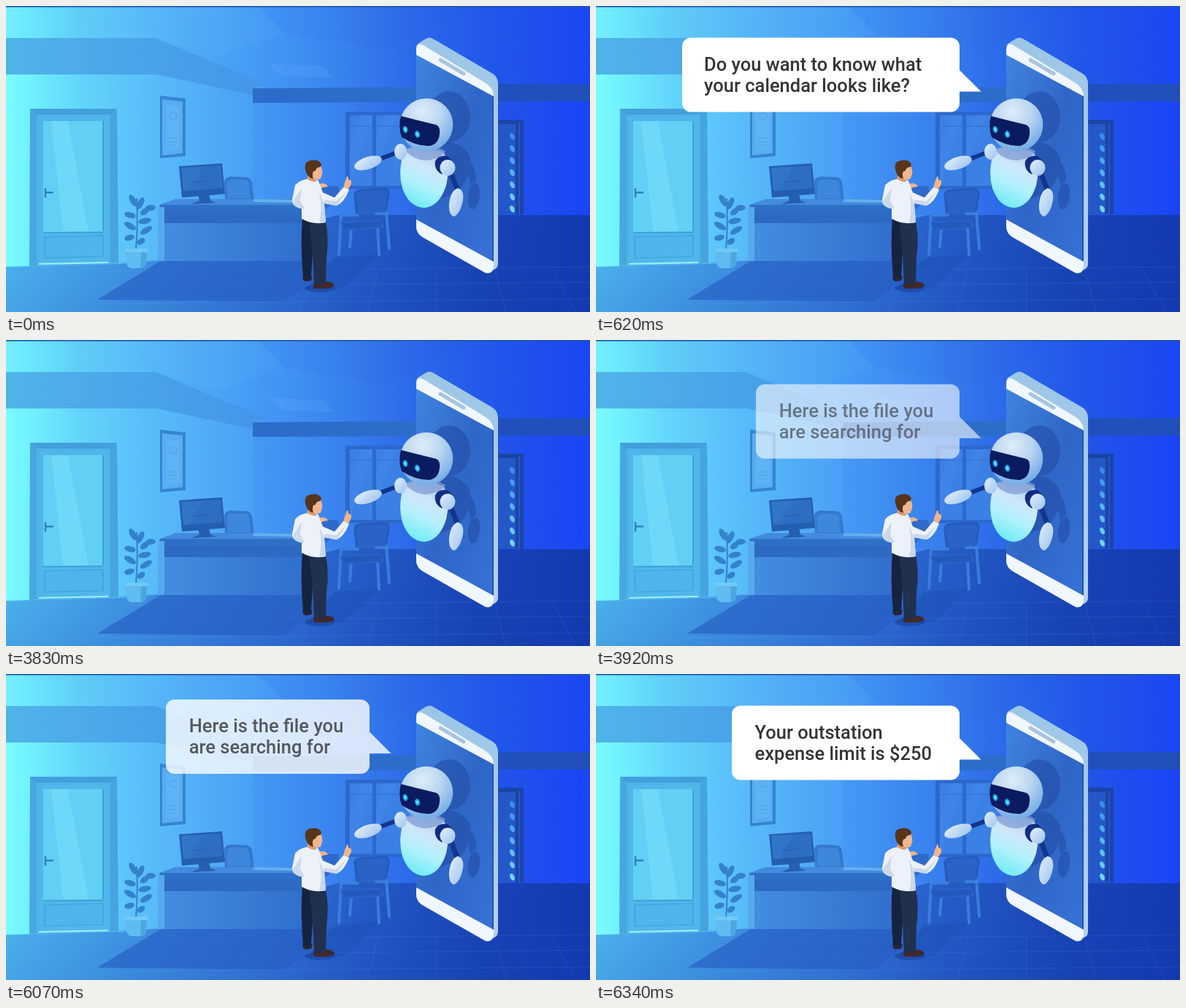
Animation, 800 px wide and 420 px high, one loop 8 s. Source, as an HTML page:

```html
<!DOCTYPE html>
<html lang="en">
<head>
<meta charset="utf-8">
<title>Office assistant</title>
<style>
  html, body { margin: 0; width: 100%; height: 100%; overflow: hidden; background: #2f7ae5; }
  svg { display: block; width: 100vw; height: 100vh; }
  text { font: 500 25.5px Roboto, Arial, sans-serif; fill: #333438; }
</style>
</head>
<body>
<svg id="stage" viewBox="0 0 800 420">
  <defs>
    <linearGradient id="wall" gradientUnits="userSpaceOnUse" x1="0" x2="800" y1="0" y2="0">
      <stop offset="0" stop-color="#7afcff"/><stop offset=".045" stop-color="#70f0fe"/>
      <stop offset=".12" stop-color="#64d6fb"/><stop offset=".25" stop-color="#58bcf9"/>
      <stop offset=".42" stop-color="#4aa0f6"/><stop offset=".56" stop-color="#3d87f0"/>
      <stop offset=".7" stop-color="#2d69e9"/><stop offset=".85" stop-color="#2153ea"/>
      <stop offset="1" stop-color="#1a44f6"/>
    </linearGradient>
    <linearGradient id="floor" gradientUnits="userSpaceOnUse" x1="0" x2="800" y1="0" y2="0">
      <stop offset="0" stop-color="#50bcf2"/><stop offset=".2" stop-color="#439be8"/>
      <stop offset=".42" stop-color="#367bdb"/><stop offset=".6" stop-color="#255dc8"/>
      <stop offset=".8" stop-color="#1945b6"/><stop offset="1" stop-color="#1439b0"/>
    </linearGradient>
    <linearGradient id="shade" x1="0" x2="0" y1="0" y2="1">
      <stop offset="0" stop-color="#1238a8" stop-opacity="0"/><stop offset="1" stop-color="#1238a8" stop-opacity=".18"/>
    </linearGradient>
    <linearGradient id="glass" x1="0" x2="1" y1="0" y2="1">
      <stop offset="0" stop-color="#3f84e0"/><stop offset=".5" stop-color="#2f66c8"/><stop offset="1" stop-color="#3672d4"/>
    </linearGradient>
    <linearGradient id="edge" x1="0" x2="0" y1="0" y2="1">
      <stop offset="0" stop-color="#9cc6e6"/><stop offset="1" stop-color="#b5d2ef"/>
    </linearGradient>
    <linearGradient id="band" x1="0" x2="1" y1="0" y2="0">
      <stop offset="0" stop-color="#50b4e8"/><stop offset="1" stop-color="#4494ea"/>
    </linearGradient>
    <linearGradient id="desk" x1="0" x2="1" y1="0" y2="0">
      <stop offset="0" stop-color="#438ee0"/><stop offset="1" stop-color="#306ece"/>
    </linearGradient>
    <radialGradient id="head" cx=".42" cy=".25" r=".78">
      <stop offset="0" stop-color="#dfecf9"/><stop offset=".45" stop-color="#bbd7f1"/><stop offset="1" stop-color="#6ea9e4"/>
    </radialGradient>
    <linearGradient id="torso" x1=".7" x2=".35" y1="0" y2="1">
      <stop offset="0" stop-color="#a9c6ec"/><stop offset=".32" stop-color="#cfe6fa"/>
      <stop offset=".62" stop-color="#b2f1fc"/><stop offset="1" stop-color="#6cecf8"/>
    </linearGradient>
    <linearGradient id="limb" x1="0" x2="1" y1="0" y2="1">
      <stop offset="0" stop-color="#e4f0fd"/><stop offset="1" stop-color="#9cc3ef"/>
    </linearGradient>
    <radialGradient id="eye">
      <stop offset="0" stop-color="#8ff8ff"/><stop offset=".6" stop-color="#23bdf2"/><stop offset="1" stop-color="#1479d0"/>
    </radialGradient>
  </defs>

  <!-- room -->
  <rect width="800" height="420" fill="url(#wall)"/>
  <path d="M0 0H800V107L562 111L356 112L205 44H0Z" fill="#1d6be0" opacity=".08"/>
  <path d="M347 2L383 38L290 68L205 44H0V2Z" fill="#8fe3ff" opacity=".04"/>
  <path d="M347 2H640L562 40L520 60L383 38Z" fill="#1b55d8" opacity=".07"/>
  <path d="M360 80L433 82L450 99L378 96Z" fill="#7cc4ff" opacity=".12"/>
  <path d="M338 132H562V287H338Z" fill="#1f62dd" opacity=".1"/>
  <path d="M0 44H205L358 108L338 113V122L206 94H0Z" fill="url(#band)"/>
  <path d="M338 113L562 111V132L338 133Z" fill="#2c6dcb"/>
  <path d="M674 107H800V131H674Z" fill="#2150bd"/>
  <path d="M0 358L155 354L212 349L455 287H800V420H0Z" fill="url(#floor)"/>
  <path d="M0 358L212 349L455 287H800V420H0Z" fill="url(#shade)"/>
  <g id="tiles" stroke="#6fb7f7" stroke-width=".7" opacity=".2"></g>
  <path d="M125 403L212 350H458L380 406Z" fill="#265fc4" opacity=".65"/>
  <path d="M412 388L450 346L512 340L462 388Z" fill="#1d50b6" opacity=".55"/>
  <rect width="800" height="1.6" fill="#1d55ad"/>

  <!-- left door -->
  <path d="M33 141H152L154 353L32 357Z" fill="#47a8e0"/>
  <path d="M33 141L42 149H143L152 141Z" fill="#429fdb"/>
  <path d="M42 149H143V353L42 356Z" fill="#4fb4e9"/>
  <path d="M46 153H140V351L46 355Z" fill="#50b7ea"/>
  <path d="M51 158H133V309L51 311Z" fill="#62d0f5"/>
  <path d="M62 158H85L113 309H78Z" fill="#83e4fb" opacity=".35"/>
  <path d="M53 317L133 315V344L53 346Z" fill="#50b4ec" stroke="#3c9fd6" stroke-width="1.2"/>
  <path d="M133 158V309M51 311H133" stroke="#3b9ad4" stroke-width="1.6" fill="none"/>
  <path d="M54 250V263M54 256H65" stroke="#2c81bd" stroke-width="2.4" fill="none"/>
  <path d="M143 149L152 141L154 353L143 353Z" fill="#46a4e0"/>
  <path d="M45 354L140 352" stroke="#a4effc" stroke-width="2"/>

  <!-- wall picture -->
  <path d="M211 123L246 127V206L211 209Z" fill="#3584d2"/>
  <path d="M214 128L242 131V202L214 205Z" fill="#58adf0"/>
  <path d="M219 136L238 138V196L219 198Z" fill="#5db3f3"/>
  <path d="M222 181H235M222 186H235M224 191H233" stroke="#4e9fe2" stroke-width="1"/>
  <circle cx="229" cy="151" r="5" fill="none" stroke="#529fe2" stroke-width="1"/>

  <!-- windows -->
  <path d="M465 145H562V251H465Z" fill="#2c68cb"/>
  <path d="M471 150H502V247H471ZM507 150H562V247H507Z" fill="#3b80e4"/>
  <path d="M471 247L502 155V150H486L471 195ZM507 220L535 150H519L507 182Z" fill="#5198ee" opacity=".2"/>
  <path d="M471 165H502M507 165H562" stroke="#2f6fd2" stroke-width="1"/>

  <!-- right door -->
  <path d="M672 156H709V286H672Z" fill="#1b44a8"/>
  <path d="M672 162H698V286H672Z" fill="#2458c8"/>
  <path d="M703 160V286" stroke="#2857c3" stroke-width="2"/>
  <g id="lamps"></g>

  <!-- plant -->
  <g fill="#3481cc" id="leaves"><path d="M178 334Q181 300 179 264" fill="none" stroke="#3481cc" stroke-width="2"/></g>
  <path d="M163 333H194L192 352Q191 360 184 360H173Q166 360 165 352Z" fill="#5fbbf0"/>
  <path d="M163 333H194V338H163Z" fill="#72caf5"/>
  <path d="M185 338H193L192 352Q191 360 184 360Z" fill="#4da6e2"/>

  <!-- office chair, desk, monitor -->
  <path d="M299 240Q300 235 308 234L330 235Q336 236 337 242L340 267H300Z" fill="#3379d0"/>
  <path d="M303 243Q304 239 310 238L329 239Q333 240 333 245L335 264H303Z" fill="#3d87dc"/>
  <path d="M395 266L426 247H455L458 262L412 300Z" fill="#2f6acb"/>
  <path d="M210 273L232 265H394L420 275V283H213Z" fill="#428bde"/>
  <path d="M210 273H420V283H213Z" fill="#2e70c7"/>
  <path d="M213 282H412V350H216Z" fill="url(#desk)"/>
  <path d="M213 282H412V298H217Z" fill="#2c6ac3"/>
  <path d="M208 276H217V350H208Z" fill="#55aaed"/>
  <path d="M340 265L392 266L396 270L338 269Z" fill="#63aff0"/>
  <path d="M263 259L278 258L280 267L288 270L254 272L265 267Z" fill="#265fae"/>
  <path d="M237 220L296 216L300 258L241 263Z" fill="#245eb0"/>
  <path d="M240 222L294 219L297 250L243 254Z" fill="#2d6ec4"/>
  <path d="M240 222L270 220L252 253L243 254Z" fill="#3e86d8" opacity=".25"/>
  <path d="M254 242L280 240" stroke="#265fae" stroke-width="1.2"/>

  <!-- visitor chair -->
  <g fill="none" stroke="#3a7edb" stroke-linecap="round" stroke-linejoin="round">
    <path d="M478 259Q479 253 487 253L516 251Q525 251 524 259L519 288H481Z" fill="#2a63c5" stroke="#255bb9" stroke-width="3"/>
    <path d="M461 287H482M459 287L456 341M521 283L525 333M509 304L511 342M473 306L471 331" stroke-width="4"/>
    <path d="M459 297L514 294L517 304L462 307Z" fill="#2359ba" stroke="#2a63c5" stroke-width="2"/>
    <path d="M507 285H523" stroke-width="4"/>
  </g>

  <!-- phone -->
  <path d="M562 58Q562 52 567 50L575 45Q580 42 585 45L667 93Q674 98 674 107V353Q674 359 670 361L661 366L562 306Z" fill="url(#edge)"/>
  <path d="M562 59Q563 49 572 54L655 104.500Q668 112 668 125V355Q668 370 656 366L570 317Q562 312 562 302Z" fill="#f1f7fe"/>
  <path d="M562 67L668 124V351L562 293Z" fill="url(#glass)"/>
  <path d="M667 124V350" stroke="#2452ac" stroke-width="2"/>
  <path d="M595 74L627 93" stroke="#a9c4df" stroke-width="5" stroke-linecap="round"/>

  <!-- robot shadow -->
  <g fill="#234ca6" opacity=".6">
    <ellipse cx="607" cy="152" rx="29" ry="35"/>
    <path d="M590 186Q625 184 636 208Q638 238 616 257L594 265Z"/>
    <path d="M630 212Q643 214 644 239L636 247Z"/>
    <ellipse cx="641" cy="261" rx="8" ry="18" transform="rotate(8 641 261)"/>
  </g>

  <!-- robot -->
  <path d="M536 201L509 211" stroke="#12358f" stroke-width="6"/>
  <ellipse cx="496" cy="215.500" rx="19.500" ry="8.500" transform="rotate(-18 496 215.500)" fill="url(#limb)"/>
  <path d="M546 197Q536 226 543 250Q552 276 573 277Q594 275 603 246Q609 222 600 201Q574 190 546 197Z" fill="url(#torso)"/>
  <path d="M546 197Q574 183 602 199Q597 209 576 212Q557 211 546 197Z" fill="#809ed5" opacity=".75"/>
  <ellipse cx="540.500" cy="200" rx="8.500" ry="11" fill="url(#limb)"/>
  <path d="M597 231Q586 225 588 213Q592 204 605 206L613 214Z" fill="#102d86"/>
  <path d="M610 231L619 254" stroke="#12358f" stroke-width="7"/>
  <ellipse cx="605" cy="222" rx="10.500" ry="11" fill="url(#limb)"/>
  <path d="M619 250Q628 253 626 266Q623 284 614 289Q606 287 607 272Q609 253 619 250Z" fill="url(#limb)"/>
  <circle cx="576" cy="163" r="36.300" fill="url(#head)"/>
  <path d="M541 151Q564 157 589 163Q595 165 594 175Q593 189 581 192Q562 193 542 180Q537 165 541 151Z" fill="#0b1b60"/>
  <ellipse cx="547" cy="169.500" rx="3.300" ry="5" transform="rotate(-14 547 169.500)" fill="url(#eye)"/>
  <ellipse cx="563.500" cy="176" rx="3.500" ry="5" transform="rotate(-14 563.500 176)" fill="url(#eye)"/>

  <!-- man -->
  <ellipse cx="430" cy="387" rx="21" ry="6" fill="#173f98" opacity=".55"/>
  <path d="M407 369Q405 376 410 378L418 377L420 371Z" fill="#2a2230"/>
  <path d="M422 379Q419 386 424 388L438 388Q449 387 450 383Q448 379 439 378Z" fill="#40292c"/>
  <path d="M406 290L428 296L420 340L418 371Q413 375 407 371Q403 330 406 290Z" fill="#16233f"/>
  <path d="M415 292L438 296Q443 320 439 345L438 381Q430 384 422 381L420 340Z" fill="#20304e"/>
  <path d="M425 246Q433 241 439 245L441 248Q434 248 429 252Z" fill="#eeb58e"/>
  <path d="M462 250L464 242L467 234Q469 233 469 238L473 240Q474 246 468 252Z" fill="#efb48c"/>
  <path d="M410 238Q422 234 428 240L434 256L450 263L462 249L470 252Q464 269 453 274L436 271L438 297Q421 301 405 292L405 278Q392 276 392 266L396 246Q401 240 410 238Z" fill="#edf1f9"/>
  <path d="M405 250L403 267L409 278L405 278Q394 276 393 268Z" fill="#ccd8ec"/>
  <path d="M429 256L436 271L438 297L429 298Q434 280 429 256ZM436 266L452 268L466 255L453 274L436 271Z" fill="#cbd8ec"/>
  <path d="M414 231L425 235L425 241Q418 242 412 237Z" fill="#d99b75"/>
  <path d="M419 221L431 218Q433 224 433.500 229L431 237Q426 240 418 235Z" fill="#f0b78f"/>
  <path d="M410 224Q408 213 418 212Q428 210 432 217L431 221Q425 221 424 226L421 227Q419 231 421 237Q412 236 410 224Z" fill="#57341a"/>
</svg>

<script>
const STEP = 30, FADE = 5, RISE = 8.6, LOOP = 8000;
const byId = id => document.getElementById(id);
const stage = byId("stage");

function add(parent, tag, attrs, label) {
  const el = document.createElementNS("http://www.w3.org/2000/svg", tag);
  for (const key in attrs) el.setAttribute(key, attrs[key]);
  if (label) el.textContent = label;
  parent.appendChild(el);
  return el;
}

for (let i = 0; i < 7; i++) {
  const y = 179 + i * 16.6;
  add(byId("lamps"), "ellipse", {
    cx: 693.5, cy: y, rx: 3, ry: 5, transform: `rotate(-25 693.5 ${y})`,
    fill: `hsl(${212 - i * 3} 85% ${58 + i * 2}%)`
  });
}

// x, y, length, angle
[[174, 267, 9, 60], [184, 271, 9, -62], [170, 287, 8, 15], [190, 282, 7, -38],
 [198, 277, 7, -5], [170, 302, 9, 30], [190, 295, 9, -12], [192, 308, 9, -30],
 [169, 318, 7, -15], [185, 323, 6, -35]].forEach(([x, y, r, a]) =>
  add(byId("leaves"), "ellipse", { cx: x, cy: y, rx: r, ry: 4, transform: `rotate(${a} ${x} ${y})` }));

for (let i = 0; i < 9; i++) {
  const x = 20 + i * 95;
  add(byId("tiles"), "line", { x1: x, y1: 420, x2: x + (400 - x) * 0.16 + 30, y2: 361 });
}
for (const y of [366, 387, 410]) add(byId("tiles"), "line", { x1: 0, y1: y, x2: 800, y2: y - 8 });

function bubble(left, textX, lines, start, end) {
  const group = add(stage, "g", {});
  add(group, "path", {
    fill: "#fff",
    d: `M${left + 12} 43.500H486a12 12 0 0 1 12 12V88L527.500 117.500H498V133.500a12 12 0 0 1 -12 12` +
       `H${left + 12}a12 12 0 0 1 -12 -12V55.500a12 12 0 0 1 12 -12Z`
  });
  lines.forEach((line, i) => add(group, "text", { x: textX, y: 89 + i * 29 }, line));
  return { group, start, end };
}

// start: fully settled; end: begins to leave
const bubbles = [
  bubble(118, 148, ["Do you want to know what", "your calendar looks like?"], 620, 3710),
  bubble(219, 250.7, ["Here is the file you", "are searching for"], 3980, 6070),
  bubble(186, 217.5, ["Your outstation", "expense limit is $250"], 6340, LOOP)
];

function draw(t) {
  for (const { group, start, end } of bubbles) {
    const d = t < start ? Math.ceil((start - t) / STEP)
      : t < end ? 0 : -Math.floor((t - end) / STEP) - 1;
    const alpha = Math.max(0, 1 - Math.abs(d) / FADE);
    // box and text fade separately, so the text stays grey on the box
    for (const part of group.children) part.setAttribute("opacity", alpha);
    group.setAttribute("transform", `translate(0 ${alpha ? d * RISE : 0})`);
  }
}

const begin = performance.now();
function tick() {
  draw((performance.now() - begin) % LOOP);
  requestAnimationFrame(tick);
}
tick();
</script>
</body>
</html>
```
